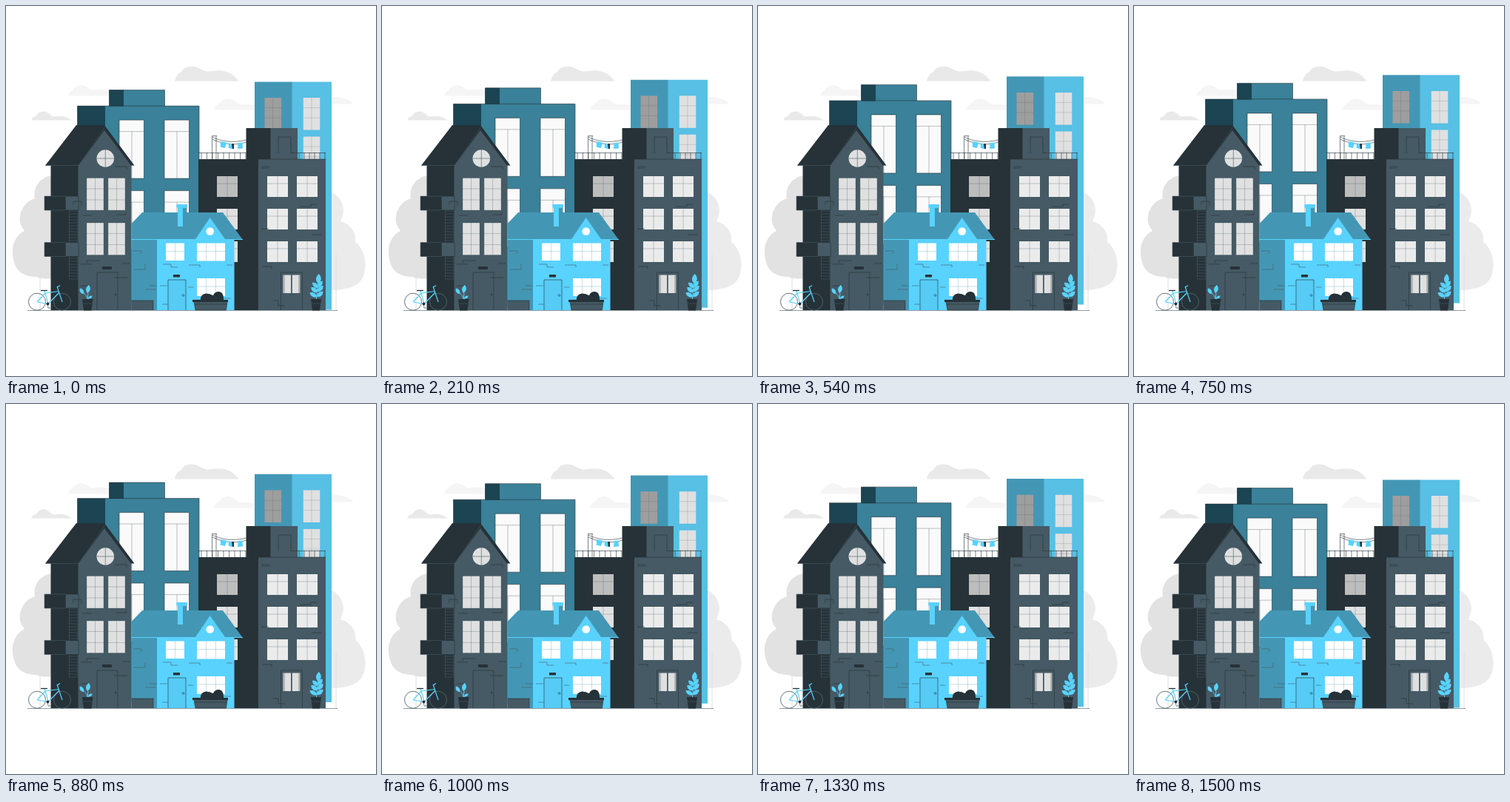
These frames come from a looping animation (500 px wide and 500 px high, 1.54 s). An HTML page:

```html
<!DOCTYPE html>
<html lang="en">
<head>
<meta charset="utf-8">
<title>City houses</title>
<style>
  html, body { margin: 0; height: 100%; overflow: hidden; background: #fff; }
  svg { display: block; width: 100vw; height: 100vh; }
  .dark { fill: #263238; }
  .slate { fill: #455a64; }
  .teal { fill: #3a8199; }
  .deep { fill: #1c4453; }
  .steel { fill: #4397b5; }
  .sky { fill: #58bfe5; }
  .blue { fill: #59d2fe; }
  .line { fill: none; stroke: #263238; stroke-width: .6; }
  .soft { stroke: #455a64; }
  .faint { stroke-opacity: .5; }
  .bright { stroke: #59d2fe; stroke-width: 1.2; }
</style>
</head>
<body>
<svg viewBox="0 0 500 500">
  <defs>
    <g id="tall">
      <path d="M0 0h33.500v79h-33.500z"/>
      <path class="line" d="M0 0H33.500V79H0z"/>
      <path class="line faint" d="M0 15.500H33.500M17 15.500V79"/>
    </g>
    <g id="tower">
      <path d="M0 0h22.500v43.500h-22.500z"/>
      <path class="line" d="M11.200 0V43.500M0 13.500H22.500M0 27H22.500" stroke-opacity=".25"/>
    </g>
    <g id="sash">
      <path d="M0 0h23v43.500h-23z"/>
      <path class="line soft faint" d="M0 0H23V43.500H0zM11.500 0V43.500M0 14.500H23M0 29.500H23"/>
    </g>
    <g id="square">
      <path d="M0 0h28v28h-28z"/>
      <path class="line soft faint" d="M14 0V28M0 10H28"/>
    </g>
    <g id="wide">
      <path d="M0 0h38v24h-38z"/>
      <path class="line faint" style="stroke:#4397b5" d="M12.500 0V24M25.500 0V24M0 11H38"/>
    </g>
    <path id="balcony" d="M52 0h28.500v19h-28.500z"/>
    <path id="leaf" d="M0 0C-5 -3 -5 -9 -1 -13C4 -9 4 -4 0 0z"/>
  </defs>

  <g id="clouds" fill="#e9e9e9">
    <path d="M228 101.500C229 96 232 91 237 89C239 84 245 81 252 81.500C260 82 264 87 271 88.500C280 88 288 86 295 88C304 90 310 95 314.500 101.500z"/>
    <path d="M34 154.500C35 151 38 149 41 148.500C44 143 51 141 56 144C60 146 61 149 65 149.500C74 148 83 149 88 154.500z"/>
    <path fill="#f5f5f5" d="M84 121.500C85 117 87 115 90 114C93 107 102 105 108 109C112 112 113 113 117 113.500C126 112 136 112 145 116V121.500zM281 140.500C282 136 285 133 288 132.500C291 126 300 123 307 127C311 129 314 132 317 133C325 132 333 133 340 136V140.500zM436 123C450 122 464 125 469.500 132.500H436z"/>
  </g>
  <g id="trees" fill="#ebebeb">
    <path fill="#e2e2e2" d="M64 229C47 230 36 244 39 260C26 264 17 277 19 293C21 299 24 302 25 304C9 312 6 331 11 346C14 360 27 366 41 366C48 369 56 369 64 368z"/>
    <path d="M430 250C445 250 456 262 456 277C455 284 453 288 452 291C465 295 474 305 472 319C484 328 488 347 484 362C479 379 462 385 430 384z"/>
    <path fill="none" stroke="#e0e0e0" d="M46 325V411M446 335V411"/>
  </g>
  <path class="line soft" d="M29 411.500H448"/>

  <g id="back">
    <g id="teal-block">
      <path class="teal" d="M139.500 114h75v22h-75zM134 135.500h127V411h-127z"/>
      <path class="deep" d="M139.500 114h19.500v22h-19.500zM96.500 135.500h37.500V411h-37.500z"/>
      <path class="line" d="M139.500 135.500V114H214.500V135.500M96.500 411V135.500H261V411"/>
      <g fill="#fafafa">
        <use href="#tall" x="153" y="154.500"/><use href="#tall" x="214" y="154.500"/>
        <use href="#tall" x="153" y="250"/><use href="#tall" x="214" y="250"/>
      </g>
    </g>
    <g id="tower-block">
      <path class="steel" d="M336 102.800h51V411h-51z"/>
      <path class="sky" d="M386.500 102.800h53.500V411h-53.500z"/>
      <use href="#tower" x="349.500" y="124.500" fill="#9e9e9e"/>
      <use href="#tower" x="401.800" y="124.500" fill="#e0e0e0"/>
      <use href="#tower" x="401.800" y="177" fill="#e0e0e0"/>
    </g>
  </g>

  <g id="roof-block">
    <path class="dark" d="M260 207H324.500V165H358V207H342V411H260z"/>
    <path class="slate" d="M357.500 165h36.500v42h38V411h-91V207h16.500z"/>
    <path class="line" d="M368 199V177h17V199M260 198.500H324.500M385 198.500H432M341 207H432"/>
    <path id="rails" class="line"/>
    <path class="line" d="M278.500 207V175.500H285M284 175.500V207M279 177C292 184 309 185 325 181M279 180C295 188 311 188 325 184"/>
    <path class="blue" d="M290.500 183l7.500 1.500l-2 7.500l-6.500 -1.500zM301 185.500l6.500 .5l-2 7.500l-5 -2zM313.500 185l6 -.5l.5 8l-7 .5z"/>
    <path class="dark" d="M305 186h3v7h-2z"/>
    <use href="#square" x="285" y="230" fill="#bdbdbd"/>
    <g fill="#e0e0e0">
      <use href="#square" x="285" y="274"/><use href="#square" x="285" y="318"/>
    </g>
    <g id="squares" fill="#ebebeb"></g>
    <path class="line" d="M371.500 411V360h29V411M353 219h-8M345 217h10v3M397 271h15v-3h8M345 301h10M413 309h13M347 352h12v3M361 398h7v7h9"/>
    <path fill="#e0e0e0" d="M374.500 363.500h10.500V388h-10.500zM386.800 363.500h10.500V388h-10.500z"/>
    <path class="line soft" d="M376 363.500V388M396 363.500V388"/>
  </g>

  <g id="gable-house">
    <path class="dark" d="M60.500 207H100V411H60.500z"/>
    <path class="slate" d="M97.500 214L133 164L169.500 214V411H97.500z"/>
    <path class="dark" d="M53 215.500L95 161H133L173.500 215.500H169L133 168L98 215.500z"/>
    <path class="line soft" d="M53 215.500H98L133 165"/>
    <circle cx="134.300" cy="206" r="11.800" fill="#e0e0e0"/>
    <path class="line soft" d="M134.300 194V218M122.500 206H146"/>
    <g fill="#e0e0e0">
      <use href="#sash" x="109" y="232.500"/><use href="#sash" x="138" y="232.500"/>
      <use href="#sash" x="109" y="293"/><use href="#sash" x="138" y="293"/>
    </g>
    <path id="ladders" class="line soft"/>
    <g class="dark" stroke="#455a64" stroke-width=".6">
      <use href="#balcony" y="257"/><use href="#balcony" y="319.500"/>
    </g>
    <path class="slate" d="M80.500 257h18v19h-18zM80.500 319.500h18v19h-18z"/>
    <path class="line" d="M80.500 257h17.500v19H80.500zM80.500 319.500h17.500v19H80.500zM91 269v-5h11v6M147 217h16v4M103 283h13M149 282h13v-3M109 348v-4h18M101 349h15M146 367h18M157 348h10M101 378h10"/>
    <path class="line" d="M123 411V360h28V411"/>
    <path class="dark" d="M130 352h13v4h-13z"/>
    <circle class="line" cx="148" cy="390" r="1"/>
  </g>

  <g id="blue-house">
    <path class="steel" d="M169.500 411V294L184 279H293L320 316H204V411z"/>
    <path class="blue" d="M204 315H256L275.700 286L296 315H308.500V411H204z"/>
    <path class="line bright" d="M169.500 315.500H257M295 315.500H320"/>
    <path class="blue" d="M230.500 268h14.500v4.500h-6V298H232V272.500h-1.500z"/>
    <path class="steel" d="M239 272.500h5.500V298h-5.500z"/>
    <circle cx="275.700" cy="304.500" r="5.300" fill="#fff"/>
    <g fill="#fff">
      <path d="M216 320.500h25V344h-25z"/>
      <use href="#wide" x="258" y="320.500"/><use href="#wide" x="258" y="368"/>
    </g>
    <path class="line faint" style="stroke:#4397b5" d="M228.500 320.500V344M216 331.500H241"/>
    <path class="line soft" d="M172 331h11v4M173 356h15v-7M188 383h15M194 378h10M212 349h11v4h9M247 350h15v3M298 350h8M208 378h10M246 380h7M285 395h19M211 403h8"/>
    <path class="line" style="fill:#56cbf5" d="M219 411V370h24V411"/>
    <path class="dark" d="M226 363h9v3.500h-9z"/>
    <circle class="line" cx="239.500" cy="391" r="1.300"/>
    <path class="slate" d="M169.500 398H199V411H169.500z"/>
    <path class="line" d="M169.500 398H199V411"/>
  </g>

  <g id="street">
    <path class="dark" d="M263 398C262 391 268 387 274 389C278 390 279 391 280 391C282 385 291 384 293 390C294 392 294 395 294 398z"/>
    <path class="slate" d="M254 400H299L297.500 411H256z"/>
    <path class="dark" d="M252 397h48v3h-48z"/>
    <path class="line" d="M254 400L256 411H297.500L299 400M255 403H298"/>

    <path class="dark" d="M103 396h14.500l-2 15.500h-10.500zM412 396h14l-2 15.500h-10z"/>
    <path class="line soft" d="M104 401l2 2l2 -2l2 2l2 -2l2 2l2 -2M413 401l2 2l2 -2l2 2l2 -2l2 2l2 -2"/>
    <path class="line bright" style="stroke-width:1" d="M110 396C109 391 107 389 104 387M110 396L111 388M111 396L115 393M419.500 396L422 367"/>
    <g class="blue" id="leaves"></g>

    <g id="bike">
      <g class="line" style="stroke:#52676f;stroke-width:.9">
        <circle cx="42" cy="399.700" r="11.500"/><circle cx="76" cy="399.700" r="11.500"/>
      </g>
      <path class="line bright" d="M42 400L53 388L57 402.500L72 387M52 385L53 388L71 385.500M42 400L57 402.500M69 379L76 400M69.500 380L73 377.500"/>
      <path class="line" style="stroke-width:1.300" d="M47 384.500H56"/>
      <circle class="dark" cx="56.500" cy="402.500" r="2"/>
      <path class="line" d="M56 402l1 6h3"/>
    </g>
  </g>
</svg>
<script>
  const byId = id => document.getElementById(id);
  const range = (from, to, step) =>
    Array.from({ length: Math.floor((to - from) / step) + 1 }, (_, i) => from + i * step);

  const posts = [...range(264, 324, 7.5), ...range(396, 432, 7)];
  byId('rails').setAttribute('d', posts.map(x => `M${x} 198V207`).join(''));

  const rungs = [...range(277, 319, 4), ...range(341, 369, 4)];
  byId('ladders').setAttribute('d',
    'M85.500 276V319M97 276V319M85.500 338V369M97 338V369' + rungs.map(y => `M85.500 ${y}H97`).join(''));

  byId('squares').innerHTML = [230, 274, 318].flatMap(y =>
    [353, 393].map(x => `<use href="#square" x="${x}" y="${y}"/>`)).join('');

  // x, y, angle, scale
  const leaves = [
    [105, 389, -30, .7], [110, 388, 15, .85], [111, 395, 65, .5],
    [422, 375, 8, 1], [421.5, 381, -40, .8], [421.5, 380, 40, .8],
    [421, 387, -48, .85], [421, 386, 48, .85], [420, 393, -55, .85], [420, 393, 55, .85]
  ];
  byId('leaves').innerHTML = leaves.map(([x, y, angle, scale]) =>
    `<use href="#leaf" transform="translate(${x} ${y}) rotate(${angle}) scale(${scale})"/>`).join('');

  const LOOP = 1540, STEPS = 37, PERIOD = 1500, RISE = 10, LEAD = 30;
  const back = byId('back');

  function draw(now) {
    const step = Math.floor((now % LOOP + 5) / LOOP * STEPS) % STEPS;
    const phase = (step * LOOP / STEPS + LEAD) % PERIOD / PERIOD;
    const lift = RISE * (1 - Math.abs(1 - 2 * phase));
    back.setAttribute('transform', `translate(0 ${-lift})`);
    requestAnimationFrame(draw);
  }
  draw(performance.now());
</script>
</body>
</html>
```
